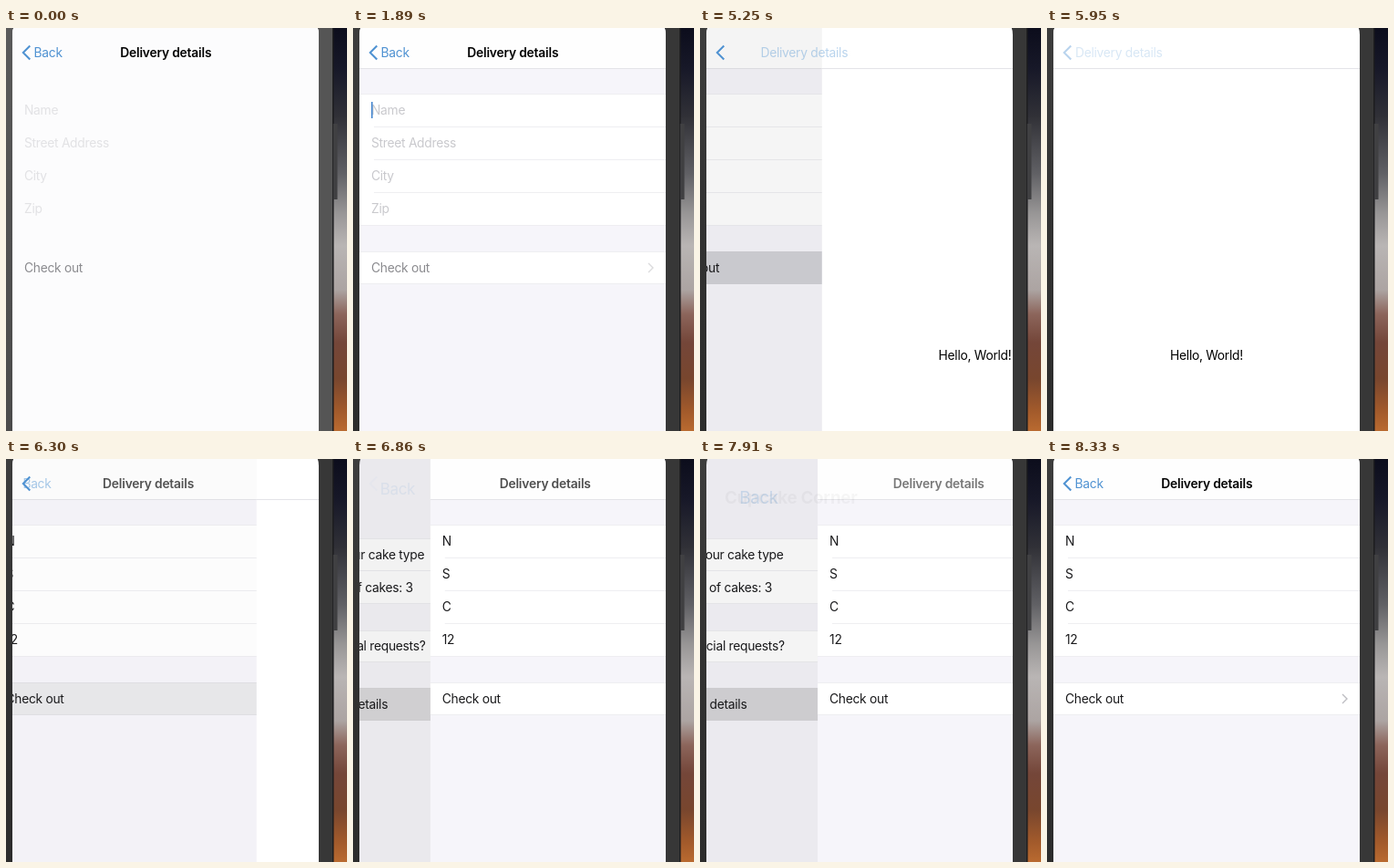
Recreate the animation shown at these times as an HTML page with a canvas. Size 374 by 442 pixels, loop 8540 ms.

```html
<!DOCTYPE html>
<html lang="en">
<head>
<meta charset="utf-8">
<title>Delivery details</title>
<style>
  html, body { margin: 0; width: 100%; height: 100%; overflow: hidden; background: #353535; }
  canvas { display: block; width: 374px; height: 442px; }
</style>
</head>
<body>
<canvas id="stage" width="374" height="442"></canvas>
<script>
const ctx = document.getElementById('stage').getContext('2d');
const LOOP = 8540, STEP = 70;
const LEFT = 7, WIDTH = 336, HEIGHT = 442;
const BLUE = '#4f92d2', INK = '#1a1a1c', HINT = '#c9c9cd', GRAY = '#8b8b8f';
const PAPER = '#f6f5fa', LINE = '#e4e4e8', HAIR = '#eeeef1';

// Start times of the page transitions
const PUSH_HELLO = 5090, POP_HELLO = 6075, POP_FORM = 6791, PUSH_FORM = 7746;

const clamp = v => Math.max(0, Math.min(1, v));
const lerp = (a, b, k) => a + (b - a) * k;

// Critically damped spring: 1 before the start, settling to 0
function spring(t, start) {
  const x = Math.max(0, t - start) * 0.0132;
  const rest = (1 + x) * Math.exp(-x);
  return rest < 0.005 ? 0 : rest;
}

function box(x, y, w, h, color) {
  ctx.fillStyle = color;
  ctx.fillRect(x, y, w, h);
}

function text(str, x, y, color, { size = 13.8, weight = 400, align = 'left', alpha = 1 } = {}) {
  if (alpha <= 0) return;
  ctx.save();
  ctx.globalAlpha *= clamp(alpha);
  ctx.font = `${weight} ${size}px Inter, "Liberation Sans", sans-serif`;
  ctx.letterSpacing = `${(weight > 400 ? -0.014 : -0.02) * size}px`;
  ctx.textAlign = align;
  ctx.fillStyle = color;
  ctx.fillText(str, x, y + size * 0.363);
  ctx.restore();
}

function chevron(x, y, w, h, color, thick, alpha = 1) {
  if (alpha <= 0) return;
  ctx.save();
  ctx.globalAlpha *= clamp(alpha);
  ctx.strokeStyle = color;
  ctx.lineWidth = thick;
  ctx.beginPath();
  ctx.moveTo(x, y - h);
  ctx.lineTo(x + w, y);
  ctx.lineTo(x, y + h);
  ctx.stroke();
  ctx.restore();
}

function pill(x, y, w, h, r, color) {
  ctx.fillStyle = color;
  ctx.beginPath();
  ctx.roundRect(x, y, w, h, r);
  ctx.fill();
}

// White block of rows with hairlines
function rows(top, bottom, splits = []) {
  box(LEFT, top, WIDTH, bottom - top, '#fff');
  box(LEFT, top, WIDTH, 1, HAIR);
  box(LEFT, bottom, WIDTH, 1, HAIR);
  for (const y of splits) box(23, y, WIDTH, 1, HAIR);
}

function page(x, draw, dim = 0) {
  if (x >= WIDTH || dim >= 1) return;
  ctx.save();
  ctx.translate(x, 0);
  ctx.beginPath();
  ctx.rect(LEFT, 0, WIDTH, HEIGHT);
  ctx.clip();
  draw();
  if (dim > 0) box(LEFT, 0, WIDTH, HEIGHT, `rgba(0,0,0,${0.065 * dim})`);
  ctx.restore();
}

const FIELDS = [
  { hint: 'Name', value: 'N', typed: 2170, y: 90 },
  { hint: 'Street Address', value: 'S', typed: 2870, y: 126 },
  { hint: 'City', value: 'C', typed: 3430, y: 162 },
  { hint: 'Zip', value: '12', typed: 3920, y: 198 }
];

function caret(t) {
  if (t < 700 || t >= 4690 || (t >= 1330 && t < 1890)) return;
  const row = t < 2450 ? 0 : t < 3080 ? 1 : t < 3640 ? 2 : 3;
  const field = FIELDS[row];
  const x = t < field.typed ? 20 : row === 3 ? 33.5 : 30;
  ctx.save();
  ctx.globalAlpha = t < 4550 ? 1 : t < 4620 ? 0.6 : 0.3;
  box(x, field.y - 9, 1.6, 18, '#4888d0');
  ctx.restore();
}

function form(t) {
  const wash = t < 490 ? 1 : t < 560 ? 0.5 : 0;
  const ready = t < 3920 ? 0 : t < 3990 ? 0.5 : 1;
  const pressed = t < 5040 ? 0 : 1 - clamp((t - POP_HELLO) / 420);

  box(LEFT, 0, WIDTH, HEIGHT, PAPER);
  box(LEFT, 0, WIDTH, 44, '#fefefe');
  box(LEFT, 44, WIDTH, 1, LINE);
  rows(72, 216, [108, 144, 180]);
  rows(245, 280);
  if (pressed > 0) box(LEFT, 245, WIDTH, 36, `rgba(209,209,214,${pressed})`);
  chevron(324, 263, 5, 5, '#bdbdc2', 1.4, 0.55 + 0.45 * ready);
  if (wash) box(LEFT, 0, WIDTH, HEIGHT, `rgba(252,252,253,${wash})`);

  const faint = t < 210 ? 0.5 + t / 420 : 1;
  for (const f of FIELDS) {
    if (t < f.typed) text(f.hint, 20, f.y, HINT, { alpha: faint });
    else text(f.value, 20, f.y, INK);
  }
  if (ready < 1) text('Check out', 20, 263, GRAY);
  text('Check out', 20, 263, INK, { alpha: ready });
  caret(t);
}

function hello() {
  box(LEFT, 0, WIDTH, HEIGHT, '#fff');
  box(LEFT, 44, WIDTH, 1, LINE);
  text('Hello, World!', 175, 359, '#000', { align: 'center' });
}

function menu(t) {
  const picked = t < PUSH_FORM ? 1 - clamp((t - POP_FORM) / 560) : 1;
  box(LEFT, 0, WIDTH, HEIGHT, PAPER);
  rows(87, 158, [122]);
  rows(188, 222);
  rows(251, 286);
  if (picked > 0) box(LEFT, 251, WIDTH, 36, `rgba(214,213,216,${picked})`);

  text('Select your cake type', 20, 105, INK);
  text('Vanilla', 317, 105, GRAY, { align: 'right' });
  chevron(324, 105, 5, 5, '#bdbdc2', 1.4);

  text('Number of cakes: 3', 20, 141, INK);
  pill(254, 128, 76, 26, 7, '#eeeeef');
  box(291.5, 134, 1, 14, '#d2d2d6');
  box(267, 140, 12, 1.5, INK);
  box(305, 140, 12, 1.5, INK);
  box(310.3, 134.7, 1.5, 12, INK);

  text('Any special requests?', 20, 205, INK);
  pill(289, 193, 41, 25, 12.5, '#e6e6e9');
  pill(291, 195, 21, 21, 10.5, '#fff');

  text('Delivery details', 20, 269, INK);
  chevron(324, 269, 5, 5, '#bdbdc2', 1.4);
}

// Bar labels move apart from the pages; a = hello shown, b = menu shown
function bar(t, a, b) {
  const pushing = t >= PUSH_FORM;
  const title = 'Delivery details';

  let touch = 1;
  if (t >= 5880 && t < POP_HELLO) touch = t < 5950 ? 0.5 : 0.22;
  else if (t >= POP_HELLO && t < 6650) touch = lerp(1, 0.22, a);
  else if (t >= 6720 && !pushing) touch = t < 6790 ? 0.5 : 0.3;

  const size = lerp(13.8, 27.5, b);
  const y = lerp(27, pushing ? 70 : 54, b);
  const backX = 30.6 + b * (pushing ? 35 : -4) - a * 60;
  const backAlpha = (1 - 2 * a) * (pushing ? 1 - 2.1 * b : touch * (1 - 2.8 * b));
  text('Back', backX, y, BLUE, { size, alpha: backAlpha });
  chevron(26.3, 27, -7.5, 7.5, BLUE, 2, (1 - 4 * b) * Math.min(1, touch + 0.18));

  text('Cupcake Corner', lerp(31, 20, b), lerp(27, 69, b), '#000',
    { size, weight: 700, alpha: (b - 0.34) / 0.66 });

  const titleX = lerp(125.3, 31, a) + b * (pushing ? 238 : 153);
  text(title, titleX, 27, '#000', { weight: 600, alpha: 1 - 1.6 * a - 1.3 * b });
  text(title, titleX, 27, BLUE, { alpha: (1.6 * a - 0.6) * touch });
}

function gradient(stops) {
  const g = ctx.createLinearGradient(0, 0, 0, HEIGHT);
  for (const [at, color] of stops) g.addColorStop(at, color);
  return g;
}
const wall = gradient([
  [0, '#0c0d1c'], [0.1, '#171828'], [0.22, '#313137'], [0.36, '#606064'],
  [0.46, '#989696'], [0.54, '#b9b5b4'], [0.65, '#aca4a2'], [0.71, '#8c655b'],
  [0.78, '#744639'], [0.87, '#78462e'], [0.95, '#a25a2b'], [1, '#b96a30']
]);
const edge = gradient([[0, '#3d3d3d'], [0.5, '#323232'], [1, '#2c2c2c']]);

function phone(t) {
  box(358, 0, 16, HEIGHT, wall);
  box(0, 0, LEFT + 4, HEIGHT, edge);
  box(339, 0, 19, HEIGHT, '#373737');
  const wash = t < 490 ? 0.15 : t < 560 ? 0.08 : 0;
  if (wash) box(0, 0, 358, HEIGHT, `rgba(255,255,255,${wash})`);
  box(358, 0, 1.5, HEIGHT, '#1d1d1f');
  box(358, 105, 5.5, 83, '#404042');
  box(358, 105, 1, 83, '#232325');
}

function clipScreen() {
  const right = LEFT + WIDTH;
  ctx.beginPath();
  ctx.moveTo(LEFT, HEIGHT);
  ctx.lineTo(LEFT, 7);
  ctx.quadraticCurveTo(LEFT, 3, LEFT + 1.2, 0);
  ctx.lineTo(right - 1.2, 0);
  ctx.quadraticCurveTo(right, 3, right, 7);
  ctx.lineTo(right, HEIGHT);
  ctx.clip();
}

function draw(t) {
  const a = t < POP_HELLO ? 1 - spring(t, PUSH_HELLO) : spring(t, POP_HELLO);
  const b = t < PUSH_FORM ? 1 - spring(t, POP_FORM) : spring(t, PUSH_FORM);
  phone(t);
  ctx.save();
  clipScreen();
  if (b > 0) page(-0.3 * WIDTH * (1 - b), () => menu(t), Math.min(0.99, 1 - b));
  page(b * WIDTH - 0.3 * WIDTH * a, () => form(t), Math.min(0.99, a));
  if (a > 0) page((1 - a) * WIDTH, hello);
  bar(t, a, b);
  ctx.restore();
}

const begin = performance.now();
function tick() {
  const t = (performance.now() - begin) % LOOP;
  draw(Math.floor(t / STEP) * STEP);
  requestAnimationFrame(tick);
}
tick();
</script>
</body>
</html>
```
